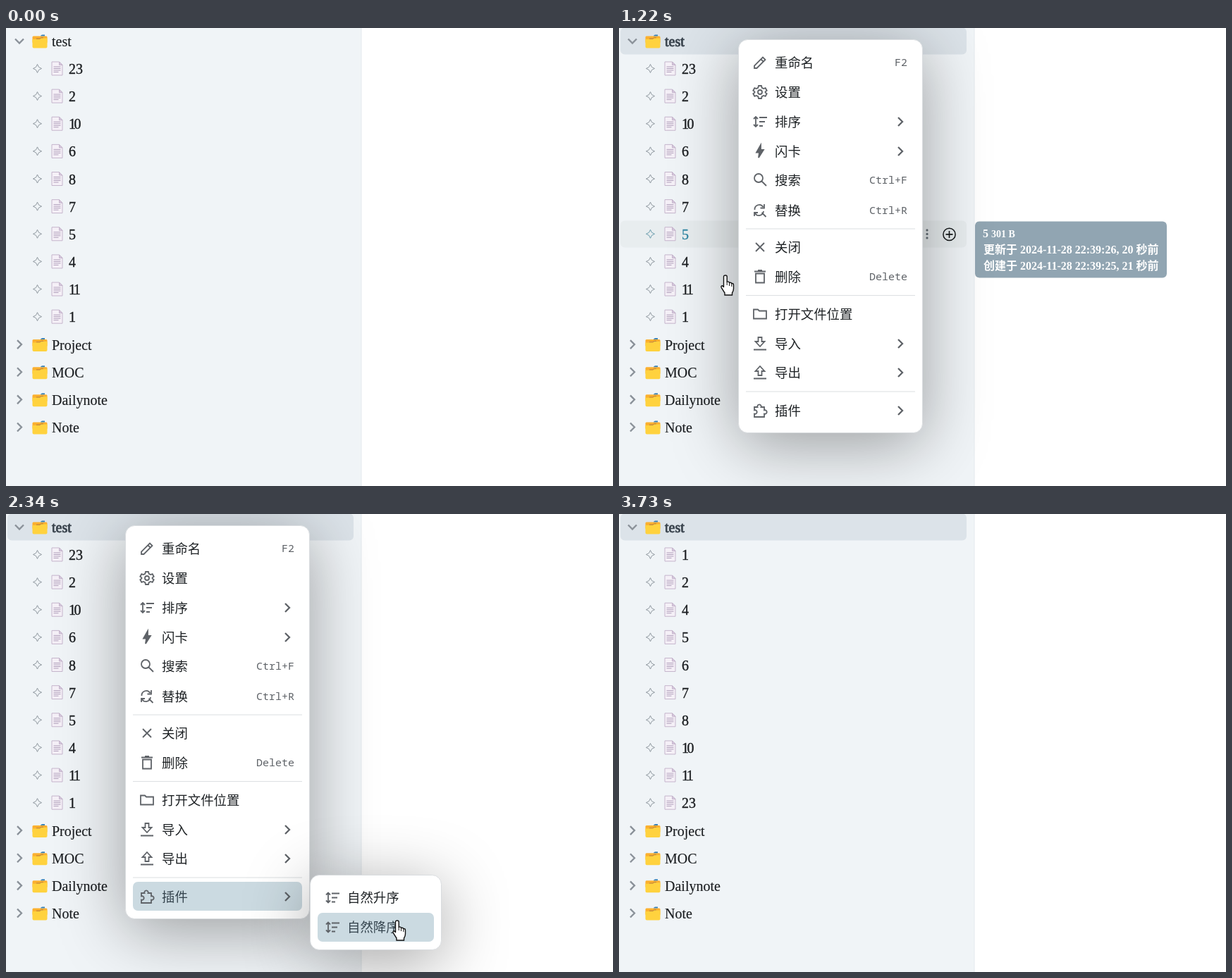
Recreate the animation shown at these times as an HTML page. Size 861x650 px, loop 4.19 s.

```html
<!DOCTYPE html>
<html lang="zh">
<head>
<meta charset="utf-8">
<title>Sort documents</title>
<style>
html, body { margin: 0; width: 100%; height: 100%; overflow: hidden; background: #fff; }
#stage { display: block; width: 861px; height: 650px; }
text { white-space: pre; }
.row { font: 20px "Liberation Serif", "Noto Serif", serif; }
.num { letter-spacing: -2.5px; }
.item { font: 18.4px "Noto Sans CJK SC", "Noto Sans CJK", sans-serif; }
.key { font: 15px "Noto Sans Mono", monospace; text-anchor: end; fill: #5f6368; }
.tip { font: bold 16px "Liberation Serif", "Noto Sans CJK SC", "Noto Sans CJK", serif; fill: #fff; }
.small { font-size: 14px; }
.line { fill: none; stroke: #5f6368; stroke-width: 1.8px; }
.panel { fill: #fff; stroke: #d9dcdf; filter: drop-shadow(0 16px 46px rgba(0,0,0,.36)); }
</style>
</head>
<body>
<svg id="stage" viewBox="0 0 861 650"></svg>
<script>
const LOOP = 4190, PITCH = 39.13, LAG = 80;
const stage = document.getElementById('stage');

// Bursts of activity: start, end, number of steps
const bursts = [[130, 510, 6], [830, 900, 2], [1050, 1530, 7], [1600, 2080, 8],
  [2150, 2340, 4], [2480, 2690, 4], [2960, 3300, 6], [3590, 3730, 3]];
const steps = [0];
for (const [a, b, n] of bursts)
  for (let i = 0; i < n; i++) steps.push(Math.floor((a + (b - a) * i / (n - 1)) / 10) * 10);

// Pointer path: time, x, y
const path = [[130, 545, 628], [200, 330, 335], [280, 245, 250], [350, 210, 135], [430, 185, 30],
  [510, 168, 16], [1000, 168, 16], [1050, 165, 60], [1130, 155, 290], [1210, 151, 351],
  [1290, 140, 420], [1370, 145, 495], [1530, 190, 540], [1730, 290, 552], [1940, 421, 547],
  [2080, 440, 548], [2150, 485, 545], [2270, 545, 555], [2340, 555, 577], [2410, 555, 577],
  [2690, 551, 544], [3520, 551, 544], [3590, 575, 562], [3660, 634, 597]];

function pointer(t) {
  if (t <= path[0][0]) return path[0].slice(1);
  const i = path.findIndex(p => p[0] >= t);
  if (i < 0) return path[path.length - 1].slice(1);
  const [t0, x0, y0] = path[i - 1], [t1, x1, y1] = path[i], k = (t - t0) / (t1 - t0);
  return [x0 + (x1 - x0) * k, y0 + (y1 - y0) * k];
}

const at = (x, y, body) => `<g transform="translate(${x} ${y})">${body}</g>`;
const shape = (d, attrs = '') => `<path d="${d}" ${attrs}/>`;
const rect = (x, y, w, h, r, attrs) => `<rect x="${x}" y="${y}" width="${w}" height="${h}" rx="${r}" ${attrs}/>`;
const text = (x, y, s, cls, attrs = '') => `<text x="${x}" y="${y}" class="${cls}" ${attrs}>${s}</text>`;

const icons = {
  pencil: 'M-8 8V4.5L4-7.5 7.5-4-4.5 8ZM1-5 5-1',
  gear: 'M-2-9H2L2.7-6.2 5-4.9 7.7-5.8 9.7-2.3 7.6-.6V.6L9.7 2.3 7.7 5.8 5 4.9 2.7 6.2 2 9H-2L-2.7 6.2-5 4.9-7.7 5.8-9.7 2.3-7.6 .6V-.6L-9.7-2.3-7.7-5.8-5-4.9-2.7-6.2ZM-3 0A3 3 0 1 0 3 0A3 3 0 1 0-3 0',
  sort: 'M-1-6H10M-1 0H7M-1 6H4M-6-7V7M-9-4L-6-7-3-4M-9 4L-6 7-3 4',
  bolt: 'M1-9L-5 1.5H-1L-2 9 5-2H1Z',
  search: 'M4-3A6 6 0 1 1-8-3A6 6 0 1 1 4-3M2.5 1.5L9 8',
  replace: 'M-7.5-1A6.5 6.5 0 0 1 4.5-5M6-9V-3.5H.5M-8 8V3H-3M-7 4A6.5 6.5 0 0 0 5 1M2.5 3L8.5 9',
  close: 'M-6-6L6 6M6-6L-6 6',
  trash: 'M-6-4.5V8.5H6V-4.5ZM-8-7.5H8M-3-9H3',
  folder: 'M-9-6.5H-3L-1-4.5H9V6.5H-9Z',
  load: 'M-2.5-9H2.5V-3H6.5L0 4-6.5-3H-2.5ZM-9 8.5H9',
  save: 'M-2.5 4V-2H-6.5L0-9 6.5-2H2.5V4ZM-9 8.5H9',
  puzzle: 'M-8-5H-3.5A2.7 2.7 0 1 1 1.5-5H6V-.5A2.7 2.7 0 1 1 6 4.5V9H-8V4.5A2.7 2.7 0 1 0-8-.5Z',
};
const menu = [[49, 'pencil', '重命名', 'F2'], [91, 'gear', '设置'], [133, 'sort', '排序', '>'],
  [175, 'bolt', '闪卡', '>'], [216, 'search', '搜索', 'Ctrl+F'], [259, 'replace', '替换', 'Ctrl+R'],
  [311, 'close', '关闭'], [353, 'trash', '删除', 'Delete'], [406, 'folder', '打开文件位置'],
  [448, 'load', '导入', '>'], [489, 'save', '导出', '>'], [543, 'puzzle', '插件', '>']];

const chevron = (x, y, color, turn = 0) =>
  at(x, y, shape('M-3-6L3 0-3 6', `transform="rotate(${turn})" fill="none" stroke="${color}" stroke-width="2.3"`));

const folderIcon = rect(-10.5, -7.5, 21, 10, 1.5, 'fill="#fbb02f"') +
  shape('M1-8L3-9.5H7V-7.5H1Z', 'fill="#3e83b5"') + shape('M-5-4.5H0L2-6H5V-4.5L1-3H-5Z', 'fill="#c98b3a"') +
  shape('M-10.5-3H0L2-4.5H10.5V7.5Q10.5 9.5 8.5 9.5H-8.5Q-10.5 9.5-10.5 7.5Z', 'fill="#ffd23e"');
const docIcon = shape('M-7.5-9.5H3L7.5-5V9.5H-7.5Z', 'fill="#f5f0f7" stroke="#c5b5cc"') +
  shape('M3-9.5V-5H7.5Z', 'fill="#d7c8de" stroke="#c5b5cc"') +
  shape('M-5-2.5H5M-5 0H5M-5 2.5H5M-5 5H2', 'stroke="#b09fbb"');
const star = color => shape('M0-6Q1-1 6 0Q1 1 0 6Q-1 1-6 0Q-1-1 0-6Z',
  `fill="none" stroke="${color}" stroke-width=".9"`);

const rowBack = (i, color) => rect(2, PITCH * i - .5, 491, 38, 6, `fill="${color}"`);
const label = (x, y, s, color, weight) =>
  text(x, y, s, /^1/.test(s) ? 'row num' : 'row', `fill="${color}" stroke="${color}" stroke-width="${weight}"`);
const rowTools = y => [-5.5, 0, 5.5].map(d => `<circle cx="437" cy="${y + d - 1}" r="1.6" fill="#667078"/>`).join('') +
  at(468.5, y - .5, '<circle r="8.6" fill="none" stroke="#15181a" stroke-width="1.5"/>' +
    shape('M-5 0H5M0-5V5', 'stroke="#15181a" stroke-width="1.6"'));

const folder = (y, name, open, color, weight = .15) =>
  chevron(19, y - 1, '#8a9199', open ? 90 : 0) + at(48, y - .5, folderIcon) + label(65, y + 6.5, name, color, weight);

function tree(s, hover) {
  const sorted = s >= 3020, chosen = s >= 900;
  const files = sorted ? [1, 2, 4, 5, 6, 7, 8, 10, 11, 23] : [23, 2, 10, 6, 8, 7, 5, 4, 11, 1];
  const left = Math.max(0, 1 - (s - 3020) / 210);
  const height = sorted ? Math.max(1, 10 * PITCH * (1 - left ** 3)) : 10 * PITCH;
  const ink = i => hover === i ? '#2f86a3' : '#1b1e21';
  let out = rect(0, 0, 504, 650, 0, 'fill="#f0f4f7"') + rect(503.5, 0, 1, 650, 0, 'fill="#e3e9ed"');
  if (hover >= 0) out += rowBack(hover, '#e8edef');
  if (chosen) out += rowBack(0, '#dce3e9');
  out += folder(19.5, 'test', true, chosen ? '#3a444e' : ink(0), chosen ? .9 : .15);
  const rows = files.map((n, i) => {
    const y = 19.5 + PITCH * i;
    return at(44.5, y - 1, star(hover === i + 1 ? '#5d93a5' : '#868f97')) +
      at(72.5, y - 1, docIcon) + label(89, y + 6.5, n, ink(i + 1), .35);
  });
  out += `<svg y="39" width="504" height="${height}">${rows.join('')}</svg>`;
  ['Project', 'MOC', 'Dailynote', 'Note'].forEach((name, i) => {
    out += folder(58.8 + height + PITCH * i, name, false, ink(11 + i));
  });
  if (hover > 0 || (hover === 0 && s < 1050)) out += rowTools(19.5 + PITCH * hover);
  return out + (hover >= 0 && hover <= 10 ? tooltip(hover, files[hover - 1]) : '');
}

function tooltip(i, n) {
  if (i === 0) return rect(503.5, 0, 284.5, 103.5, 7, 'fill="#889eac"') +
    text(514, 23, 'test <tspan class="small">3.02 kB</tspan>', 'tip') + text(515, 47, '包含 10 个子文档', 'tip') +
    text(515, 69.5, '更新于 2024-11-28 22:39:41, 38 秒前', 'tip') +
    text(515, 93, '创建于 2024-11-28 22:05:11, 35 分钟前', 'tip');
  return at(505, PITCH * i + .5, '<g opacity=".92">' + rect(0, 0, 272, 80, 6, 'fill="#889eac"') +
    text(11, 23, `${n} <tspan class="small">301 B</tspan>`, 'tip') +
    text(12, 46, '更新于 2024-11-28 22:39:26, 20 秒前', 'tip') +
    text(12, 68.5, '创建于 2024-11-28 22:39:25, 21 秒前', 'tip') + '</g>');
}

function item(x, y, icon, name, active) {
  const fill = icon === 'bolt' ? 'style="fill:#5f6368"' : '';
  return at(x, y, shape(icons[icon], `class="line" ${fill}`)) +
    text(x + 21, y + 6.8, name, 'item', `fill="${active ? '#36454f' : '#1f2326'}"`);
}

function menus(s, [x, y]) {
  const plugin = s >= 1600, mark = 'fill="#cbdae1"';
  let out = rect(169.5, 16.5, 261, 558, 13, 'class="panel"');
  for (const sep of [285, 379.5, 516]) out += rect(180, sep - .5, 240, 1, 0, 'fill="#dcdfe2"');
  if (plugin) out += rect(180, 522, 240, 41, 7, mark);
  for (const [cy, icon, name, extra] of menu) {
    out += item(200, cy, icon, name, plugin && icon === 'puzzle');
    if (extra === '>') out += chevron(399, cy, '#5f6368');
    else if (extra) out += text(409, cy + 5, extra, 'key');
  }
  if (!plugin) return out;
  out += rect(431.5, 512.5, 186, 106, 13, 'class="panel"');
  const active = x > 442 ? (y < 566 ? 0 : 1) : -1;
  if (active >= 0) out += rect(442, 524 + 42 * active, 165, 41, 7, mark);
  return out + item(463, 544.5, 'sort', '自然升序', active === 0) + item(463, 586.5, 'sort', '自然降序', active === 1);
}

const hand = shape('M-2.5 16V2Q-2.5 0 0 0Q2.2 0 2.2 2V9Q5 8.5 5.5 10.5Q8 9.5 8.8 11.5Q11.5 11 11.5 14V19Q11.5 22 9.5 25V28H-1V25L-5.5 18Q-7 15-4.5 14.8Q-3.5 15-2.5 17Z',
  'fill="#fff" stroke="#111" stroke-width="1.4"') + shape('M2.2 9V14M5.5 11V15M8.8 12V16', 'stroke="#111"');
const arrow = shape('M0 0V22L5 17.5 8.5 26 12.5 24.5 9 16H15.5Z', 'stroke="#fff"');
const fist = shape('M-8 4L-10 0Q-10-3-6.5-2V-6Q-5-9-2.5-7Q0-10 2.5-7Q5-9 6.5-6Q9.5-6.5 9.5-3V2L7 6V10H-5V7Z',
  'fill="none" stroke="#111" stroke-width="1.7" stroke-dasharray="3 1"');
const dot = '<circle r="16.3" fill="#f37f80"/>';

function cursor(s, [x, y]) {
  if (s < 130 || s >= 3730) return '';
  if (s === 830) return at(x, y, dot + fist);
  const overLink = x < 504 || (s >= 1600 && s < 3020);
  return at(x, y, (s === 2960 ? dot : '') + (overLink ? hand : arrow));
}

function scene(s) {
  const pos = pointer(s), [hx, hy] = pointer(s - LAG);
  const edge = s >= 1050 ? 169 : 504;
  const row = s > 130 && hx < edge ? Math.floor(hy / PITCH) : -1;
  const hover = row <= 14 ? row : -1;
  return tree(s, hover) + (s >= 900 && s < 3020 ? menus(s, pos) : '') + cursor(s, pos);
}

let shown = -1;
function tick(now) {
  const t = now % LOOP, s = steps.filter(v => v <= t).pop();
  if (s !== shown) stage.innerHTML = scene(shown = s);
  requestAnimationFrame(tick);
}
tick(0);
</script>
</body>
</html>
```
